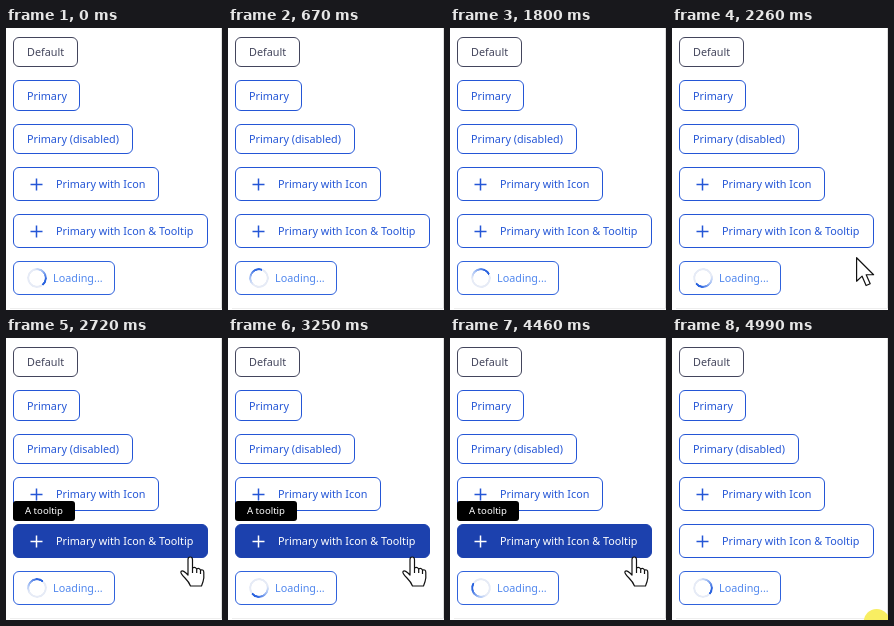
Recreate the animation shown at these times as an HTML page. Size 216 px wide and 282 px high, loop 5.05 s.

```html
<!DOCTYPE html>
<html lang="en">
<head>
<meta charset="utf-8">
<title>Buttons</title>
<style>
  html, body { margin: 0; width: 100%; height: 100%; overflow: hidden; background: #fff; }
  #stage { position: relative; width: 216px; height: 282px; overflow: hidden; background: #fff; }
  #stage > * { position: absolute; box-sizing: border-box; }
  .edge-right { left: 215px; top: 0; width: 1px; height: 281px; background: #dedede; }
  .edge-bottom { left: 4px; top: 280px; width: 212px; height: 1px; background: #eee; }
  .button {
    left: 7px; padding-left: 13px; border: 1px solid; border-radius: 6px;
    font: 10.8px "Noto Sans", sans-serif; white-space: nowrap;
    color: #2456d6; background: #fff;
  }
  .button.icon { padding-left: 42px; }
  .button.default { color: #43455c; }
  .button.loading { padding-left: 39px; border-color: #2f62dc; color: #5288ee; }
  .button.hover { color: #fff; background: #1c41ae; border-color: #1c41ae; }
  .button svg { position: absolute; left: 16px; top: 10px; }
  #spinner {
    left: 21px; top: 240px; width: 20px; height: 20px; border-radius: 50%;
    background: conic-gradient(#e6ebf6 0 200deg, #a9c3f5 250deg, #2a63df 320deg 360deg);
    -webkit-mask: radial-gradient(circle, transparent 7.4px, #000 8px);
    mask: radial-gradient(circle, transparent 7.4px, #000 8px);
  }
  #tooltip {
    left: 7px; top: 163px; width: 62px; height: 20px; border-radius: 3px;
    background: #000; color: #fff; text-align: center;
    font: 9.6px/20px "Noto Sans", sans-serif; white-space: nowrap;
  }
  #halo { left: -13px; top: -13px; width: 26px; height: 26px; border-radius: 50%; background: #f8ee62; }
  #cursor { left: 0; top: 0; overflow: visible; }
  #cursor path { fill: #fff; stroke: #111; stroke-width: 1.2; stroke-linejoin: round; }
</style>
</head>
<body>
<div id="stage">
  <div class="edge-right"></div>
  <div class="edge-bottom"></div>
  <div id="spinner"></div>
  <div id="tooltip">A tooltip</div>
  <div id="halo"></div>
  <svg id="cursor" width="1" height="1">
    <path id="arrow" d="M0 0V23.5L5.5 18.4 9.5 27.8 13.6 26 9.6 17H17Z"/>
    <path id="hand" d="M0 2.5Q0 0 2.2 0T4.5 2.5V11Q7 9.5 8.7 12 11 10.5 12.5 13 15.8 12 15.8 15.5V21Q15.5 24 13.5 29H2.5Q1 25-3 21-8 16-7 14.5-5 12.5 0 18ZM4.5 11V16M8.7 12V16M12.5 13V17"/>
  </svg>
</div>
<script>
const LOOP = 5050, STEP = LOOP / 76, SPIN = 1000;
const stage = document.getElementById('stage');
const get = id => document.getElementById(id);
const spinner = get('spinner'), tooltip = get('tooltip'), halo = get('halo');
const cursor = get('cursor'), arrow = get('arrow'), hand = get('hand');

// label, top, width, height, classes
const buttons = [
  ['Default', 9, 65, 30, 'default'],
  ['Primary', 52, 67, 31, ''],
  ['Primary (disabled)', 96, 120, 30, ''],
  ['Primary with Icon', 139, 146, 34, 'icon'],
  ['Primary with Icon & Tooltip', 186, 195, 34, 'icon'],
  ['Loading...', 233, 102, 34, 'loading']
].map(([label, top, width, height, kind]) => {
  const el = document.createElement('div');
  el.className = 'button ' + kind;
  el.textContent = label;
  Object.assign(el.style, {
    top: top + 'px', width: width + 'px', height: height + 'px', lineHeight: height - 2 + 'px'
  });
  if (kind === 'icon') {
    el.insertAdjacentHTML('beforeend',
      '<svg width="13" height="13"><path d="M6.5 .5v12M.5 6.5h12" stroke="currentColor" stroke-width="1.5"/></svg>');
  }
  stage.insertBefore(el, spinner);
  return el;
});
const hoverButton = buttons[4];

// time, x, y of the pointer
const path = [
  [1990, 210, 302], [2130, 200, 272], [2260, 184.5, 229.5], [2390, 182, 219],
  [4520, 182, 219], [4720, 189, 238], [4990, 205, 285], [5050, 208, 300]
];

function pointerAt(t) {
  const i = path.findIndex(point => point[0] >= t);
  if (i < 1) return [210, 310];
  const [t0, x0, y0] = path[i - 1], [t1, x1, y1] = path[i];
  const k = (t - t0) / (t1 - t0);
  return [x0 + (x1 - x0) * k, y0 + (y1 - y0) * k];
}

function draw(t) {
  const [x, y] = pointerAt(t);
  const over = y < 220;
  spinner.style.transform = `rotate(${140 + 360 * t / SPIN}deg)`;
  cursor.style.transform = `translate(${x}px, ${y}px)`;
  halo.style.transform = `translate(${x}px, ${y}px)`;
  halo.style.opacity = y > 255 ? 1 : 0;
  arrow.style.display = over ? 'none' : '';
  hand.style.display = over ? '' : 'none';
  tooltip.style.display = over ? '' : 'none';
  hoverButton.classList.toggle('hover', over);
}

const start = performance.now();
function tick() {
  const t = (performance.now() - start) % LOOP;
  draw(Math.min(75, Math.floor((t + 5) / STEP)) * STEP);
  requestAnimationFrame(tick);
}
tick();
</script>
</body>
</html>
```
